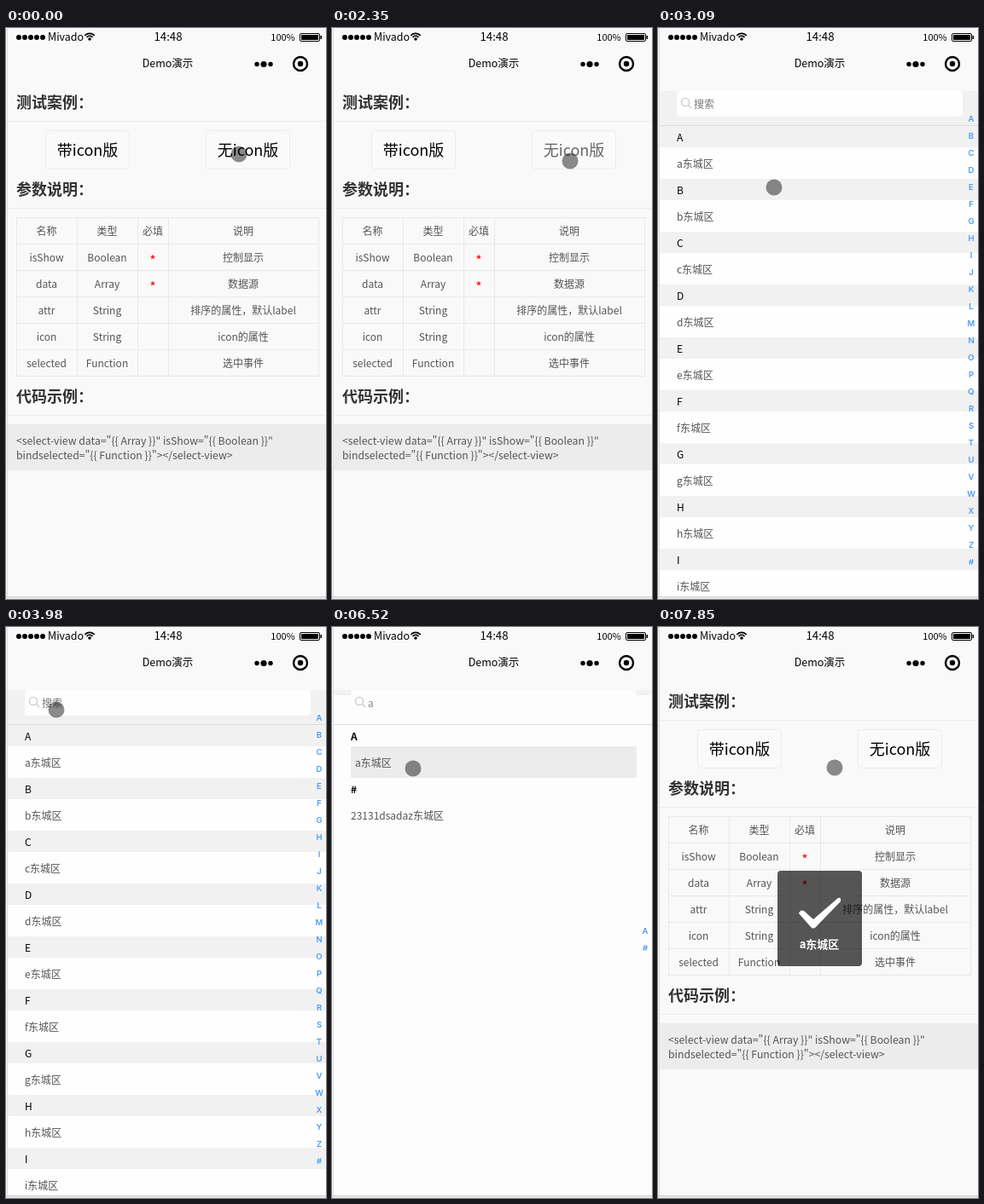
Recreate the animation shown at these times as an HTML page with a canvas. Size 375x670 px, loop 8000 ms.

```html
<!DOCTYPE html>
<html lang="zh-CN">
<head>
<meta charset="utf-8">
<title>Demo演示</title>
<style>
html, body { margin: 0; width: 100%; height: 100%; overflow: hidden; background: #f9f9f9; }
canvas { display: block; width: 375px; height: 670px; }
</style>
</head>
<body>
<canvas id="stage"></canvas>
<script>
const W = 375, H = 670, LOOP = 8000, TICK = 148;
const FAMILY = '"Noto Sans CJK SC", "Noto Sans CJK JP", "Noto Sans CJK", sans-serif';
const LETTERS = 'ABCDEFGHIJKLMNOPQRSTUVWXYZ#';

// Scene changes, counted in ticks
const PRESS = 16, LIST = 17, FILTER = 30, PICK = 44, BACK = 47, TOAST = 48;

// Pointer stops; it eases from one to the next
const STOPS = [
  { at: 0, x: 273, y: 148 },
  { at: 5, x: 280, y: 455 },
  { at: 9, x: 23, y: 424 },
  { at: 13, x: 180, y: 135 },
  { at: PRESS, x: 279, y: 156 },
  { at: 21, x: 136, y: 187 },
  { at: 26, x: 59, y: 97 },
  { at: 32, x: 59, y: 97 },
  { at: 34, x: 148, y: 103 },
  { at: 38, x: 112, y: 166 },
  { at: 41, x: 157, y: 100 },
  { at: PICK, x: 95, y: 166 },
  { at: 51, x: 95, y: 166 },
  { at: 53, x: 207, y: 165 }
];

const ROWS = [
  ['名称', '类型', '必填', '说明'],
  ['isShow', 'Boolean', '*', '控制显示'],
  ['data', 'Array', '*', '数据源'],
  ['attr', 'String', '', '排序的属性，默认label'],
  ['icon', 'String', '', 'icon的属性'],
  ['selected', 'Function', '', '选中事件']
];
const COLS = [12, 83, 154, 190, 366];
const ROW_H = 31, TABLE_Y = 222;

const canvas = document.getElementById('stage');
const ctx = canvas.getContext('2d');
const ratio = window.devicePixelRatio || 1;
canvas.width = W * ratio;
canvas.height = H * ratio;

function rect(x, y, w, h, color) {
  ctx.fillStyle = color;
  ctx.fillRect(x, y, w, h);
}

function disc(x, y, r, color) {
  ctx.fillStyle = color;
  ctx.beginPath();
  ctx.arc(x, y, r, 0, Math.PI * 2);
  ctx.fill();
}

function arc(x, y, r, width, color, from = 0, to = Math.PI * 2) {
  ctx.strokeStyle = color;
  ctx.lineWidth = width;
  ctx.beginPath();
  ctx.arc(x, y, r, from, to);
  ctx.stroke();
}

function box(x, y, w, h, r, fill, stroke) {
  ctx.beginPath();
  ctx.roundRect(x, y, w, h, r);
  ctx.fillStyle = fill;
  ctx.fill();
  if (!stroke) return;
  ctx.lineWidth = 1;
  ctx.strokeStyle = stroke;
  ctx.stroke();
}

// y is the optical middle of the line
function text(str, x, y, size, color, align = 'left', weight = 400, family = FAMILY) {
  ctx.font = `${weight} ${size}px ${family}`;
  ctx.textAlign = align;
  ctx.fillStyle = color;
  ctx.fillText(str, x, y + size * 0.38);
}

function statusBar() {
  for (let i = 0; i < 5; i++) disc(15 + i * 7, 11, 3, '#000');
  text('Mivado', 49, 10.5, 12.5, '#000');
  for (const r of [4.6, 7.6]) arc(98, 14, r, 1.7, '#000', -Math.PI * 0.77, -Math.PI * 0.23);
  disc(98, 13, 1.8, '#000');
  text('14:48', 190, 10, 13.3, '#000', 'center');
  text('100%', 324.5, 10.5, 11, '#000', 'center');
  box(344.5, 6.5, 23, 9, 1.5, '#f9f9f9', '#000');
  rect(346, 8, 20, 6, '#000');
  rect(368.5, 9, 1.5, 4, '#000');
}

function navBar() {
  statusBar();
  text('Demo演示', 189.5, 41.5, 12.5, '#000', 'center');
  for (const side of [-1, 0, 1]) disc(302 + side * 8, 42.5, side ? 2.7 : 3.6, '#000');
  arc(345, 42, 8, 2.4, '#000');
  disc(345, 42, 3.2, '#000');
}

function heading(str, y) {
  text(str, 12, y, 18, '#333', 'left', 700);
  rect(2, y + 22, W - 2, 1, '#ececec');
}

function button(str, x, pressed) {
  box(x + 0.5, 120.5, 98, 45, 4, '#fafafa', '#ececec');
  text(str, x + 49.5, 143, 18, pressed ? '#666' : '#000', 'center');
}

function table() {
  ROWS.forEach((row, i) => row.forEach((cell, j) => {
    const mid = (COLS[j] + COLS[j + 1]) / 2;
    const y = TABLE_Y + 16.5 + i * ROW_H;
    if (cell === '*') text(cell, mid, y + 3, 16, '#f00', 'center');
    else text(cell, mid, y, 12, '#555', 'center');
  }));
  for (let i = 0; i <= ROWS.length; i++) rect(12, TABLE_Y + i * ROW_H, 355, 1, '#e9e9e9');
  for (const x of COLS) rect(x, TABLE_Y, 1, ROWS.length * ROW_H + 1, '#e9e9e9');
}

function mainPage(pressed) {
  heading('测试案例：', 87);
  button('带icon版', 46, false);
  button('无icon版', 234, pressed);
  heading('参数说明：', 189);
  table();
  heading('代码示例：', 432);
  rect(2, 465, W - 2, 54, '#ececec');
  text('<select-view data="{{ Array }}" isShow="{{ Boolean }}"', 12, 484, 12.25, '#555');
  text('bindselected="{{ Function }}"></select-view>', 12, 501, 12.25, '#555');
}

function searchBox(value, fill, color) {
  box(22, 74, 335, 30, 4, fill);
  arc(32, 87, 4.6, 1.4, '#ccc');
  ctx.beginPath();
  ctx.moveTo(35.3, 90.3);
  ctx.lineTo(39, 94);
  ctx.stroke();
  text(value, 42, 89, 12, color);
  rect(2, 114, W - 2, 1, '#ddd');
}

function index(letters) {
  const top = 366 - (letters.length - 1) * 10;
  [...letters].forEach((c, i) => {
    text(c, 367, top + i * 20, 9.5, '#4a9cf6', 'center', 600, 'Inter, sans-serif');
  });
}

function listPage() {
  rect(2, 74, W - 2, 41, '#f1f1f1');
  searchBox('搜索', '#fefefe', '#777');
  for (let i = 0; i < 9; i++) {
    const y = 115 + i * 62, c = LETTERS[i];
    rect(2, y, W - 2, 25, '#f1f1f1');
    rect(2, y + 25, W - 2, 37, '#fefefe');
    text(c, 22, y + 13, 12, '#000');
    text(c.toLowerCase() + '东城区', 22, y + 44, 12, '#555');
  }
  index(LETTERS);
}

function resultPage(picked) {
  rect(2, 74, W - 2, H, '#fdfdfd');
  rect(2, 74, W - 2, 6, '#f1f1f1');
  searchBox('a', '#fdfdfd', '#888');
  text('A', 22, 128, 12, '#000', 'left', 700);
  if (picked) rect(22, 140, 335, 37, '#ececec');
  text('a东城区', picked ? 27 : 22, 159, 12, '#555');
  text('#', 22, 190, 12, '#000', 'left', 700);
  text('23131dsadaz东城区', 22, 221, 12, '#555');
  index('A#');
}

function toast(alpha) {
  ctx.globalAlpha = alpha;
  box(140, 286, 99, 112, 4, 'rgba(0,0,0,.66)');
  ctx.fillStyle = '#fff';
  ctx.beginPath();
  ctx.moveTo(165, 336);
  ctx.quadraticCurveTo(167, 331, 171, 333);
  ctx.lineTo(182, 343);
  ctx.lineTo(211, 318);
  ctx.quadraticCurveTo(215, 317, 214, 322);
  ctx.lineTo(185, 352);
  ctx.quadraticCurveTo(182, 355, 179, 352);
  ctx.fill();
  text('a东城区', 189, 372, 13, '#fff', 'center', 700);
  ctx.globalAlpha = 1;
}

function edges() {
  rect(0, 0, 1, H, '#f4f4f4');
  rect(1, 0, 1, 667, '#dedede');
  rect(0, 667, W, 1, '#cfcfcf');
  rect(0, 668, W, 2, '#e8e8e8');
}

function pointer(tick) {
  const next = STOPS.findIndex(s => s.at > tick);
  if (next < 0) return STOPS[STOPS.length - 1];
  const a = STOPS[next - 1], b = STOPS[next];
  const t = (tick - a.at) / (b.at - a.at);
  const k = t * t * (3 - 2 * t);
  return { x: a.x + (b.x - a.x) * k, y: a.y + (b.y - a.y) * k };
}

function draw(time) {
  // The screen refreshes in coarse steps
  const tick = Math.floor((time + 20) / TICK);
  ctx.setTransform(ratio, 0, 0, ratio, 0, 0);
  rect(0, 0, W, H, '#f9f9f9');
  navBar();
  if (tick < LIST || tick >= BACK) mainPage(tick === PRESS);
  else if (tick < FILTER) listPage();
  else resultPage(tick >= PICK);
  if (tick >= TOAST) toast(Math.min(1, (tick - TOAST + 1) / 2));
  edges();
  const p = pointer(tick);
  disc(p.x, p.y, 9.5, 'rgba(0,0,0,.45)');
}

function frame() {
  draw(performance.now() % LOOP);
  requestAnimationFrame(frame);
}
frame();
</script>
</body>
</html>
```
